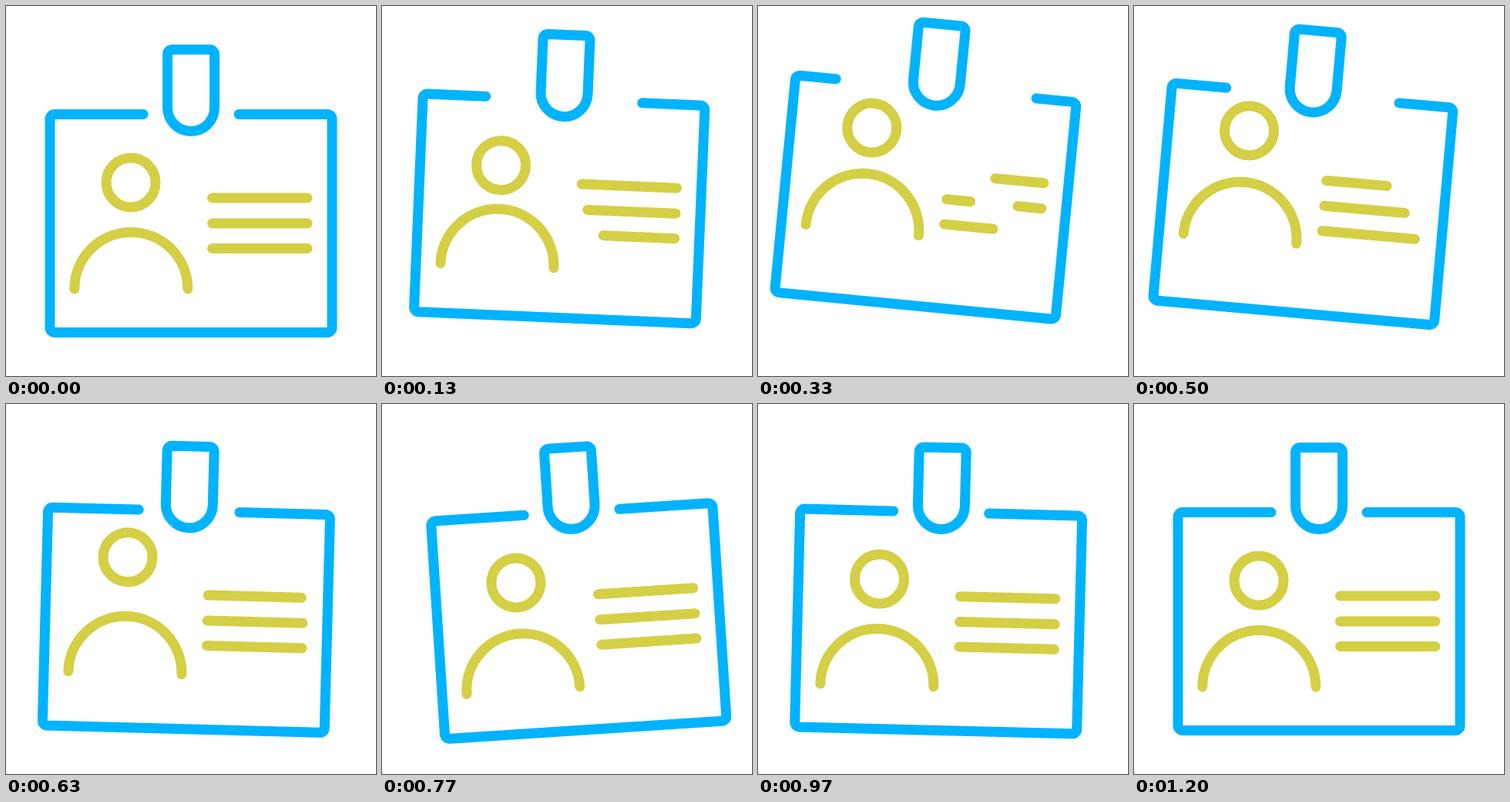
These frames come from a looping animation (480 px wide and 480 px high, 1.53 s). An HTML page with a canvas:

```html
<!DOCTYPE html>
<html lang="en">
<head>
<meta charset="utf-8">
<title>Badge</title>
<style>
  html, body { margin: 0; width: 100%; height: 100%; overflow: hidden; background: #fff; }
  canvas { display: block; width: 100vmin; height: 100vmin; }
</style>
</head>
<body>
<canvas id="stage" width="480" height="480"></canvas>
<script>
const ctx = document.getElementById('stage').getContext('2d');
const BLUE = '#00b3ff', YELLOW = '#d4cf45';
const LOOP = 1530, STEP = 100 / 3, LAST_STEP = 36;
const TAU = Math.PI * 2, CORNER = 6;

const clamp = v => Math.min(1, Math.max(0, v));

// Bezier easing with flat ends; a and b are the handles' x positions.
const ease = (a, b) => x => {
  x = clamp(x);
  let lo = 0, hi = 1;
  for (let i = 0; i < 24; i++) {
    const s = (lo + hi) / 2, r = 1 - s;
    if (3 * r * r * s * a + 3 * r * s * s * b + s ** 3 < x) lo = s; else hi = s;
  }
  return lo * lo * (3 - 2 * lo);
};
const rise = ease(0.23, 0.38), fall = ease(0.67, 0.73);
const swingOut = ease(0.27, 0.4), swingIn = ease(0.6, 0.73);
const easeBoth = ease(0.3, 0.7);

// Up during ten steps, down during the next ten.
const hop = n => n < 10 ? rise(n / 10) : 1 - fall((n - 10) / 10);

const SWING = [[0, 0], [12, 5.7], [24, -4.05], [30, 1.6], [36, 0]];
function swing(n) {
  for (let i = 1; i < SWING.length; i++) {
    const [n0, a0] = SWING[i - 1], [n1, a1] = SWING[i];
    if (n <= n1) {
      const curve = i % 2 ? swingOut : swingIn;
      return a0 + (a1 - a0) * curve((n - n0) / (n1 - n0));
    }
  }
  return 0;
}

function stroke(color, build) {
  ctx.strokeStyle = color;
  ctx.beginPath();
  build();
  ctx.stroke();
}

// Polyline with rounded inner corners.
function line(...points) {
  ctx.moveTo(...points[0]);
  for (let i = 1; i < points.length - 1; i++) {
    ctx.arcTo(...points[i], ...points[i + 1], CORNER);
  }
  ctx.lineTo(...points[points.length - 1]);
}

function drawClip() {
  stroke(BLUE, () => {
    line([209.5, 132], [209.5, 56.5], [270.5, 56.5], [270.5, 132]);
    ctx.arc(240, 132, 30.5, 0, Math.PI);
    ctx.closePath();
  });
}

function drawCard(trim) {
  stroke(BLUE, () => line(
    [178 - trim, 140.5], [57, 140.5], [57, 423.5],
    [423, 423.5], [423, 140.5], [302 + trim, 140.5]
  ));
}

function drawPerson(headLift, bodyLift) {
  stroke(YELLOW, () => ctx.arc(162, 229 - headLift, 32, 0, TAU));
  stroke(YELLOW, () => ctx.arc(162.3, 367 - bodyLift, 73.5, Math.PI, TAU));
}

// A gap half as long as the line runs across it from left to right.
function drawTextLine(y, progress) {
  const x = 267.5, length = 123.5;
  const front = progress * length * 1.5, tail = front - length / 2;
  if (front < length) stroke(YELLOW, () => line([x + front, y], [x + length, y]));
  if (tail > 0) stroke(YELLOW, () => line([x, y], [x + tail, y]));
}

function draw(n) {
  ctx.setTransform(1, 0, 0, 1, 0, 0);
  ctx.fillStyle = '#fff';
  ctx.fillRect(0, 0, 480, 480);
  ctx.lineWidth = 13;
  ctx.lineCap = ctx.lineJoin = 'round';

  const lift = hop(n);
  ctx.translate(240, 48 - 32.8 * lift);
  ctx.rotate(swing(n) * Math.PI / 180);
  ctx.translate(-240, -48);

  drawCard(68.5 * lift);
  drawClip();
  drawPerson(36 * hop(Math.max(0, n - 4)), 36 * hop(Math.max(0, n - 2)));
  [249, 282, 314.5].forEach((y, i) => drawTextLine(y, easeBoth((n - 4 + 2 * i) / 16)));
}

function tick() {
  const t = performance.now() % LOOP;
  draw(Math.min(LAST_STEP, Math.floor(t / STEP + 0.11)));
  requestAnimationFrame(tick);
}
tick();
</script>
</body>
</html>
```
